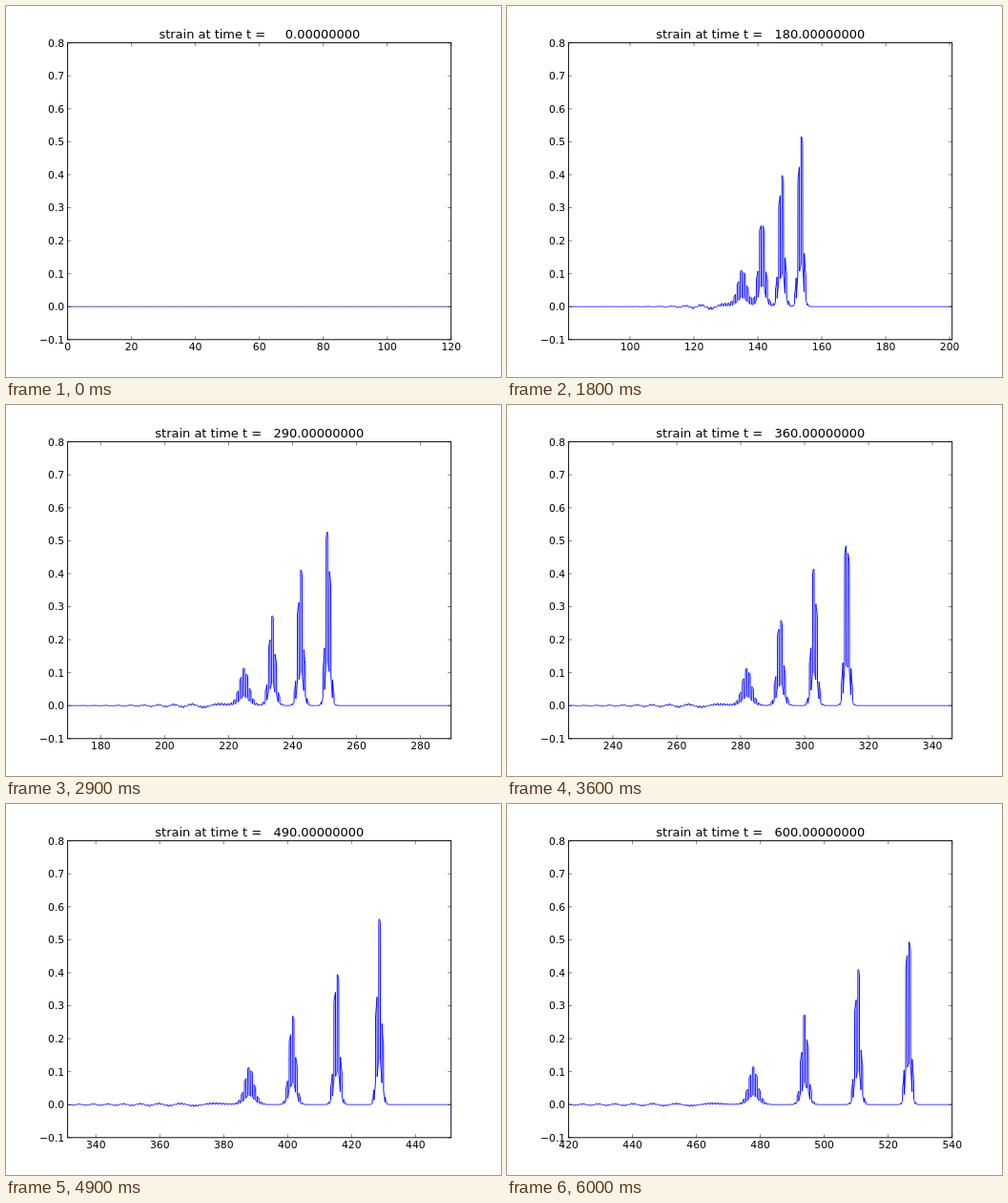
An HTML page for the animation above (6100 ms loop, 519 px wide and 389 px high).

```html
<!DOCTYPE html>
<html lang="en">
<head>
<meta charset="utf-8">
<title>Strain in a layered medium</title>
<style>
  html, body { margin: 0; width: 100%; height: 100%; overflow: hidden; background: #fff; }
  svg { display: block; width: 519px; height: 389px; }
  text { font: 10.81px "DejaVu Sans", sans-serif; white-space: pre; fill: #000; }
  #title { font-size: 12.97px; text-anchor: middle; }
  .y { text-anchor: end; }
  .x { text-anchor: middle; }
  .tick { stroke: #000; stroke-width: .5; }
</style>
</head>
<body>
<svg viewBox="0 0 519 389">
  <defs><clipPath id="clip"><rect id="area"/></clipPath></defs>
  <rect width="519" height="389" fill="#fff"/>
  <path id="curve" clip-path="url(#clip)" fill="none" stroke-width=".95" stroke-linejoin="round"/>
  <g id="yAxis"></g>
  <g id="xAxis"></g>
  <rect id="box" fill="none" stroke="#000" stroke-width=".95"/>
  <text id="title" x="265.8" y="34.4"></text>
</svg>
<script>
const $ = id => document.getElementById(id);
const LEFT = 64.6, RIGHT = 466.7, TOP = 38.6, BOTTOM = 349.8;
const SPAN = 120, FRAMES = 61, STEP_MS = 100, STEP_T = 10;
const px = (x, x0) => LEFT + (x - x0) / SPAN * (RIGHT - LEFT);
const py = v => BOTTOM - (v + 0.1) / 0.9 * (BOTTOM - TOP);
const windowStart = t => Math.max(0, 420 * (t - 80) / 520);

// Nonlinear elastic waves, stress = exp(K * strain) - 1, in layers half a unit wide.
// Staggered leapfrog: strain at cell centres, velocity at cell edges.
const CELLS = 24, LENGTH = 560;
function simulate() {
  const n = CELLS * LENGTH, half = CELLS / 2;
  const strain = new Float64Array(n), stress = new Float64Array(n), vel = new Float64Array(n + 1);
  const K = new Float64Array(n), invRho = new Float64Array(n + 1);
  for (let i = 0; i < n; i++) K[i] = i % CELLS < half ? 4 : 1;
  for (let i = 1; i < n; i++) invRho[i] = 2 / (K[i] + K[i - 1]);

  const steps = Math.ceil(STEP_T * CELLS / 0.72), dt = STEP_T / steps, r = dt * CELLS;
  const wall = t => t < 20 ? -0.1 * (1 + Math.cos(Math.PI * (t - 10) / 10)) : 0;
  const shots = [];
  for (let f = 0; f < FRAMES; f++) {
    const t0 = f * STEP_T, x0 = windowStart(t0);
    const first = Math.floor(x0 * CELLS);
    shots.push({ first, data: Float32Array.from(strain.subarray(first, first + SPAN * CELLS + 1)) });
    const a = Math.max(0, Math.floor((x0 - 15) * CELLS));
    const b = Math.min(n - 1, Math.ceil((0.9 * (t0 + STEP_T) + 8) * CELLS));
    for (let s = 0; s < steps; s++) {
      if (a === 0) vel[0] = wall(t0 + (s + 0.5) * dt);
      for (let i = a + 1; i < b; i++) vel[i] += r * invRho[i] * (stress[i] - stress[i - 1]);
      for (let i = a; i < b; i++) {
        const e = strain[i] += r * (vel[i + 1] - vel[i]);
        stress[i] = Math.exp(K[i] * e) - 1;
      }
    }
  }
  return shots;
}

const tick = (x, y, dx, dy) =>
  `<line class="tick" x1="${x}" y1="${y}" x2="${x + dx}" y2="${y + dy}"/>`;
const label = (cls, x, y, s) => `<text class="${cls}" x="${x}" y="${y}">${s}</text>`;

function setUp() {
  for (const id of ["area", "box"]) {
    const size = { x: LEFT, y: TOP, width: RIGHT - LEFT, height: BOTTOM - TOP };
    for (const k in size) $(id).setAttribute(k, size[k]);
  }
  let out = "";
  for (let i = -1; i <= 8; i++) {
    const y = py(i / 10);
    out += tick(LEFT, y, 3.6, 0) + tick(RIGHT, y, -3.6, 0)
      + label("y", 61.2, y + 4, (i / 10).toFixed(1).replace("-", "\u2212"));
  }
  $("yAxis").innerHTML = out;
}

function draw(f) {
  const t = f * STEP_T, x0 = windowStart(t), { first, data } = shots[f];
  let d = "";
  data.forEach((v, i) => {
    d += (i ? "L" : "M") + px((first + i + 0.5) / CELLS, x0).toFixed(2) + " " + py(v).toFixed(2);
  });
  $("curve").setAttribute("d", d);
  $("curve").setAttribute("stroke", f ? "#00f" : "#1c1c90");

  let axis = "";
  for (let x = Math.ceil(x0 / 20) * 20; x <= x0 + SPAN; x += 20) {
    const p = px(x, x0);
    axis += tick(p, TOP, 0, 3.6) + tick(p, BOTTOM, 0, -3.6) + label("x", p, 361.4, x);
  }
  $("xAxis").innerHTML = axis;
  $("title").textContent = "strain at time t = " + t.toFixed(8).padStart(14);
}

setUp();
const shots = simulate();
const start = performance.now();
let shown = -1;
function loop() {
  const f = Math.floor((performance.now() - start) / STEP_MS) % FRAMES;
  if (f !== shown) draw(shown = f);
  requestAnimationFrame(loop);
}
loop();
</script>
</body>
</html>
```
